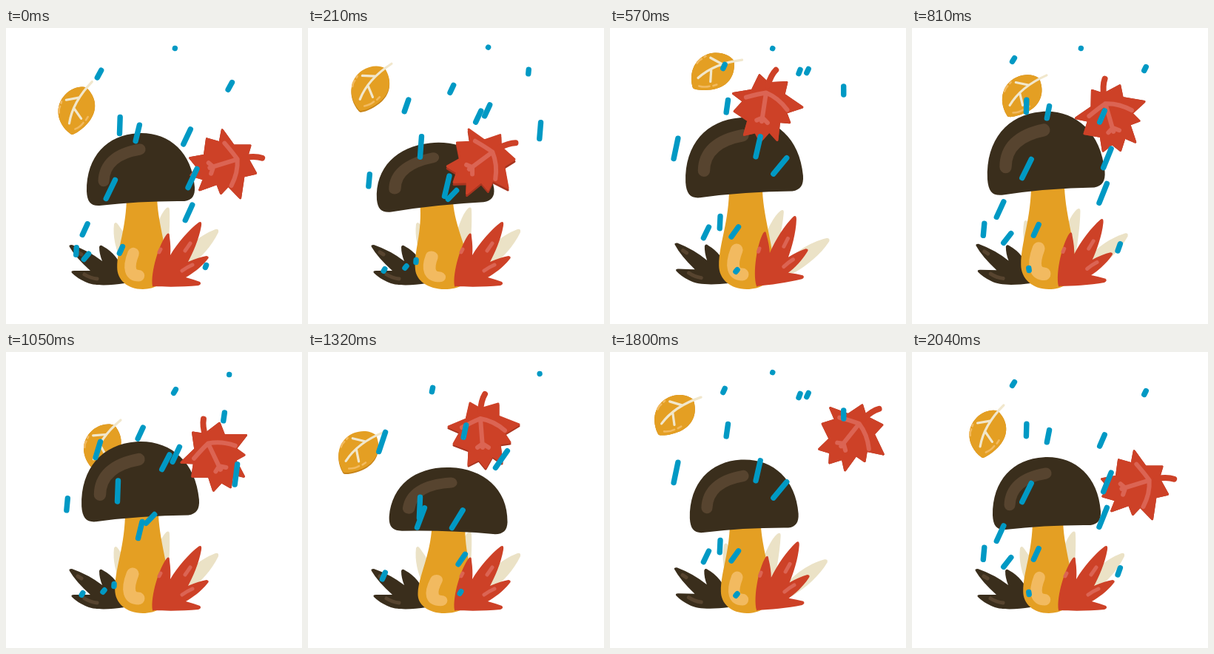
Animation, 400 px wide and 400 px high, one loop 2070 ms. Source, as an HTML page:

```html
<!DOCTYPE html>
<html lang="en">
<head>
<meta charset="utf-8">
<title>Autumn rain</title>
<style>
  html, body { margin: 0; width: 100%; height: 100%; overflow: hidden; background: #fff; }
  svg { display: block; width: 100vw; height: 100vh; }
  .line { fill: none; stroke-linecap: round; stroke-linejoin: round; }
  .dark { fill: #3a2e1c; }
  .darkLine { stroke: #57442f; }
  .gold { fill: #e49f23; }
  .goldLine { stroke: #f2ba60; }
  .cream { fill: #ebe2c6; }
  .creamLine { stroke: #f1e7cc; }
  .red { fill: #cd4127; }
  .redLine { stroke: #db6453; }
  .maple { stroke-width: 3; stroke-linejoin: round; }
</style>
</head>
<body>
<svg viewBox="0 0 400 400">
  <defs>
    <path id="blade" d="M-30,18 C-33,-8 -16,-24 3,-24 C15,-24 26,-18 30,-10 C30,8 20,21 3,24 C-8,26 -22,24 -28,21 Q-30,20 -30,18Z"/>
    <path id="mapleShape" d="M-4,-30 L20,-37 20,-20 48,-9 28,3 36,15 22,17 25,42 12,33 3,49 -6,38 -20,45 -19,25 -40,17 -31,1 -47,-6 -23,-16 -18,-38Z"/>
  </defs>

  <g id="cream" class="cream">
    <path d="M158,320 Q143,290 146,265 Q148,261 151,265 Q165,283 175,310Z"/>
    <path d="M195,300 Q205,255 216,244 Q221,240 221,247 Q222,270 218,310Z"/>
    <path d="M225,330 C235,300 262,280 283,272 Q288,271 287,276 C278,295 262,312 245,325Z"/>
  </g>

  <g id="darkGrass">
    <path class="dark" d="M160,345 C140,348 118,349 107,343 Q96,338 89,331 Q87,328 92,328 Q104,328 114,328 Q94,310 86,296 Q84,293 89,293 Q112,301 130,315 Q126,305 126,296 Q127,292 131,295 Q150,305 160,330Z"/>
    <path class="line darkLine" stroke-width="5" d="M97,303 L102,306 M106,333 Q114,338 123,339"/>
  </g>

  <g id="yellow">
    <use id="yellowShade" href="#blade" fill="#c78419"/>
    <use href="#blade" class="gold"/>
    <path class="line goldLine" stroke-width="2.6" d="M-20,-13 Q-17,-17 -13,-18 M-9,-20 L-7,-21 M-21,18 Q-14,21 -7,20 M-2,20 L3,19"/>
    <path class="line creamLine" stroke-width="3.2" d="M-21,7 Q3,-10 41,-10 M-1,-18 L13,-8 M-2,-2 L-5,14"/>
  </g>

  <g id="stem">
    <path class="gold" d="M-23,-140 L22,-140 C22,-100 37,-62 37,-30 C37,-8 18,0 1,0 C-22,0 -37,-14 -37,-32 C-37,-62 -23,-90 -23,-140Z"/>
    <path class="line goldLine" stroke-width="17" d="M-13,-53 C-22,-30 -17,-20 -5,-20"/>
  </g>

  <g id="cap">
    <path class="dark" d="M-80,-22 C-78,-74 -45,-104 0,-104 C45,-104 79,-73 80,-20 C80,-7 75,-1 64,0 Q0,-4 -62,0 C-75,0 -80,-6 -80,-22Z"/>
    <path class="line darkLine" stroke-width="16.5" d="M-54,-36 C-52,-60 -34,-76 2,-80"/>
  </g>

  <g id="redGrass">
    <path class="red" d="M198,349 C195,330 207,292 217,279 Q221,275 221,282 Q223,296 222,307 C232,290 248,272 260,263 Q265,260 264,267 C261,285 252,305 246,316 Q260,310 271,308 Q276,309 272,313 C264,323 252,332 243,337 Q254,340 262,343 Q265,346 260,348 C240,350 215,350 200,349Q198,350 198,349Z"/>
    <path class="line redLine" stroke-width="5" d="M207,303 L209,299 M238,328 Q245,323 252,320 M242,301 L249,291"/>
  </g>

  <g id="maple">
    <use id="mapleShade" href="#mapleShape" class="maple" fill="#a8341f" stroke="#a8341f"/>
    <use href="#mapleShape" class="red maple" stroke="#cd4127"/>
    <path class="line" stroke="#cd4127" stroke-width="8" d="M-4,-27 Q-3,-42 2,-50"/>
    <path class="line redLine" stroke-width="6" d="M-29,-5 Q-14,-13 -4,-17 Q14,-14 29,-1 M-4,-17 L-1,22 M-8,22 L-1,17 7,22"/>
  </g>

  <g id="rain" class="line" stroke="#0099c4" stroke-width="7.4"></g>
</svg>

<script>
const STEP = 30, FRAMES = 69, CYCLE = 13.8, LIFE = 11;
const $ = id => document.getElementById(id);
const put = (id, value) => $(id).setAttribute('transform', value);

// step, x, y, angle, shade depth
const yellowKeys = [
  [0, 95, 109, -46, 0], [7, 84, 79, -33, 2], [19, 139, 58, -7, 0], [35, 130, 126, -40, 0],
  [44, 68, 133, -22, 2], [52, 49, 79, 0, 0], [68, 102, 108, -45, 0]
];
const mapleKeys = [
  [0, 297, 185, 77, 0], [7, 237, 180, 58, 3], [19, 211, 105, 13, 0], [31, 288, 130, -19, 0],
  [35, 283, 138, -21, 0], [44, 237, 107, 0, 2], [52, 284, 67, 14, 0], [60, 328, 112, 43, 0],
  [68, 305, 181, 77, 0]
];
// step, scale x, scale y, cap x, cap y, cap angle
const mushroomKeys = [
  [0, .913, .913, 183, 237, -3], [7, .994, .837, 174, 242, -6], [19, .994, 1, 183, 225, -4],
  [35, .994, 1, 183, 225, -4], [44, 1, .846, 189, 244, 2], [52, .944, .904, 183.5, 245, -2],
  [68, .913, .913, 183, 237, -3]
];
// birth step, then three points along the fall
const drops = [
  [12, 137, 43, 94, 142, 81, 250], [4, 154, 52, 110, 187, 94, 331], [7, 228, 53, 155, 190, 90, 331],
  [12, 315, 55, 246, 166, 157, 262], [10, 279, 63, 217, 200, 132, 323], [10, 193, 56, 162, 197, 103, 327],
  [10, 156, 53, 152, 184, 146, 315], [8, 297, 61, 252, 203, 171, 328], [6, 298, 59, 268, 197, 206, 325],
  [4, 256, 59, 184, 205, 87, 333], [5, 207, 55, 144, 191, 82, 326], [4, 267, 58, 205, 192, 143, 327],
  [3, 315, 57, 307, 192, 270, 322], [2, 168, 51, 151, 188, 158, 326], [0, 223, 54, 194, 187, 161, 321]
];

const lines = drops.map(() => {
  const el = document.createElementNS('http://www.w3.org/2000/svg', 'path');
  $('rain').append(el);
  return el;
});

// Smooth periodic curve through uneven keys
function sample(keys, n) {
  const count = keys.length;
  const key = i => {
    const turn = Math.floor(i / count), k = keys[i - turn * count];
    return [k[0] + turn * FRAMES, ...k.slice(1)];
  };
  let i = count - 1;
  while (keys[i][0] > n) i--;
  const [a, b, c, d] = [i - 1, i, i + 1, i + 2].map(key);
  const h0 = b[0] - a[0], h = c[0] - b[0], h2 = d[0] - c[0], t = (n - b[0]) / h;
  return b.slice(1).map((p, j) => {
    const q = c[j + 1], slope = (q - p) / h;
    const m0 = ((p - a[j + 1]) / h0 * h + slope * h0) / (h0 + h);
    const m1 = (slope * h2 + (d[j + 1] - q) / h2 * h) / (h + h2);
    const s = 1 - t;
    return p * s * s * (1 + 2 * t) + q * t * t * (3 - 2 * t) + h * t * s * (m0 * s - m1 * t);
  });
}

function dropAge(n, birth) {
  for (let k = -2; k < 6; k++) {
    const age = n - Math.floor(CYCLE * k + .3) - birth;
    if (age >= 0 && age <= LIFE) return age;
  }
  return -1;
}

function drawDrop(el, [birth, x0, y0, x1, y1, x2, y2], n) {
  const age = dropAge(n, birth);
  el.style.display = age < 0 ? 'none' : '';
  if (age < 0) return;
  const v = (age - 1) / 5;
  const at = (a, b, c) => a * (1 - v) * (2 - v) / 2 + b * v * (2 - v) + c * v * (v - 1) / 2;
  const rate = (a, b, c) => a * (v - 1.5) + b * (2 - 2 * v) + c * (v - .5);
  const x = at(x0, x1, x2), y = at(y0, y1, y2);
  const dx = rate(x0, x1, x2), dy = rate(y0, y1, y2);
  const half = Math.min(5.5 * age + .1, 28, 6.5 * (LIFE + .5 - age)) / 2 / Math.hypot(dx, dy);
  el.setAttribute('d', `M${x - dx * half},${y - dy * half}L${x + dx * half},${y + dy * half}`);
}

function drawLeaf(id, keys, n) {
  const [x, y, angle, depth] = sample(keys, n);
  put(id, `translate(${x} ${y}) rotate(${angle})`);
  put(id + 'Shade', `rotate(${-angle}) translate(0 ${Math.max(0, depth)}) rotate(${angle})`);
}

function draw(n) {
  drawLeaf('yellow', yellowKeys, n);
  drawLeaf('maple', mapleKeys, n);

  const [sx, sy, x, y, angle] = sample(mushroomKeys, n);
  put('stem', `translate(184 353) matrix(${sx} 0 ${(183 - x) / 128} ${sy} 0 0)`);
  put('cap', `translate(${x} ${y}) rotate(${angle}) scale(${sx} ${sy})`);

  const phase = (n % (FRAMES / 2) - 10) / 22;
  const sway = phase > 0 && phase < 1 ? Math.sin(Math.PI * phase) ** 2 : 0;
  put('cream', `rotate(${8.5 * sway} 200 349)`);
  put('redGrass', `rotate(${-8.7 * sway} 198 349)`);
  put('darkGrass', `rotate(${2.3 * sway} 160 346)`);

  drops.forEach((drop, i) => drawDrop(lines[i], drop, n));
}

const start = performance.now();
function tick() {
  draw(Math.floor((performance.now() - start) / STEP) % FRAMES);
  requestAnimationFrame(tick);
}
tick();
</script>
</body>
</html>
```
